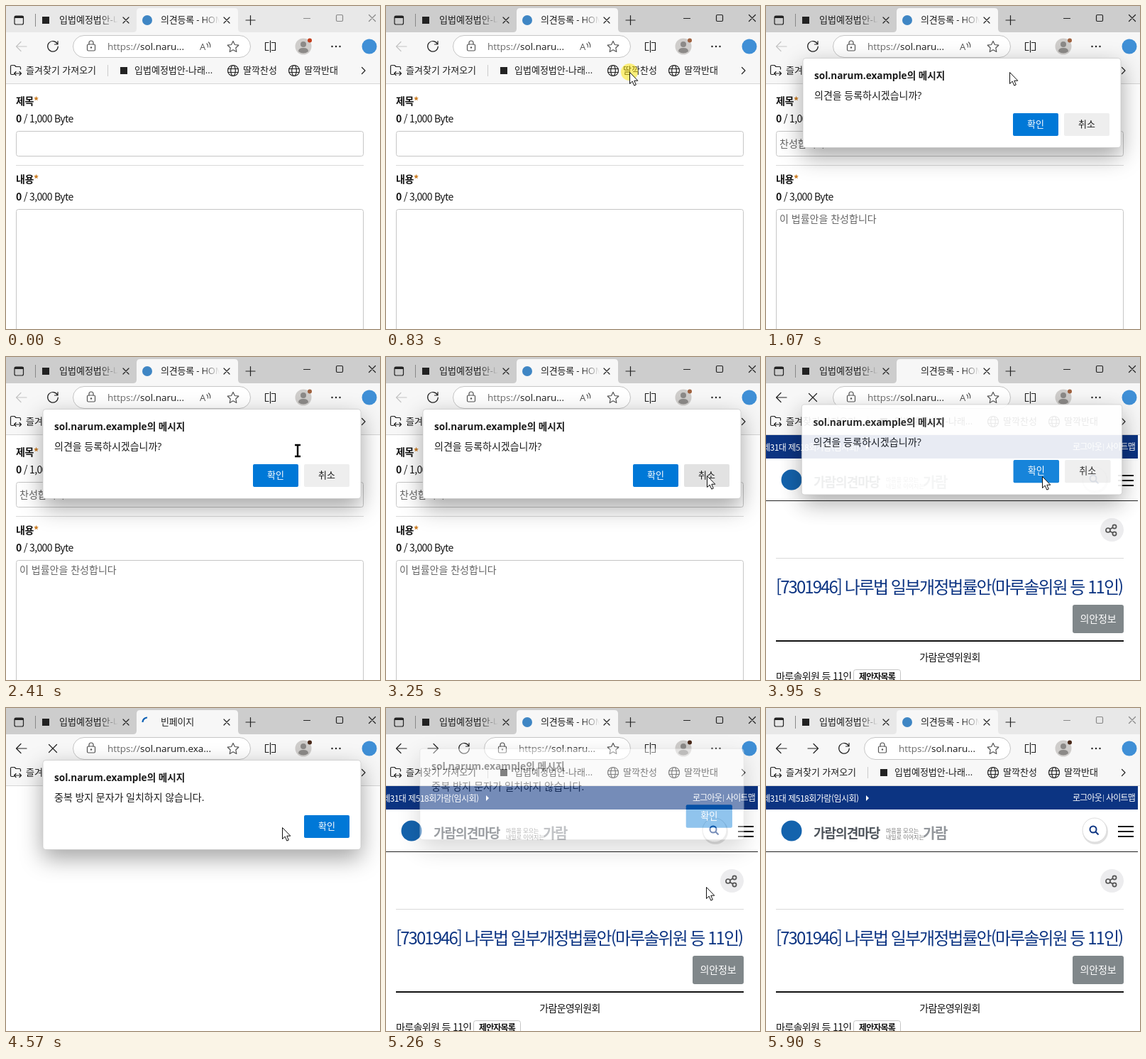
An HTML page that plays this animation: 527 by 455 pixels, repeating every 6050 ms.

```html
<!DOCTYPE html>
<html lang="ko">
<head>
<meta charset="utf-8">
<title>의견등록</title>
<style>
  html, body { margin: 0; width: 100%; height: 100%; overflow: hidden; background: #fff; }
  svg { display: block; width: 100vw; height: 100vh; }
  text { white-space: pre; }
  .ui { font: 13px "Open Sans", "Noto Sans CJK KR", sans-serif; fill: #1b1b1b; }
  .page { font: 14px "Noto Sans CJK KR", "Noto Sans CJK", sans-serif; letter-spacing: -.45px; fill: #111; }
  .b { font-weight: 700; }
  .mid { text-anchor: middle; }
  .line { fill: none; stroke: #222; stroke-width: 1.2; stroke-linecap: round; stroke-linejoin: round; }
  .field { fill: #fff; stroke: #c6c6c6; }
  .rule { fill: none; stroke: #d9d9d9; }
  .star { fill: #c9771a; }
  .bytes { letter-spacing: -.65px; }
  .typed { fill: #666; letter-spacing: 0; }
  #dialog { filter: drop-shadow(0 12px 16px rgba(0, 0, 0, .36)); }
  #dialog text { font-size: 14px; }
  #dialog .btn { font-size: 13px; }
  #dialog .white { fill: #fff; }
</style>
</head>
<body>
<svg viewBox="0 0 527 455" preserveAspectRatio="none">
  <defs>
    <linearGradient id="fade1" gradientUnits="userSpaceOnUse" x1="132" x2="158">
      <stop stop-color="#1b1b1b"/><stop offset="1" stop-color="#1b1b1b" stop-opacity="0"/>
    </linearGradient>
    <linearGradient id="fade2" gradientUnits="userSpaceOnUse" x1="276" x2="301">
      <stop stop-color="#1b1b1b"/><stop offset="1" stop-color="#1b1b1b" stop-opacity="0"/>
    </linearGradient>
    <path id="cross" d="M-4-4 4 4M4-4-4 4"/>
    <path id="arrow" d="M7 0H-7M-1-6.500-7.500 0-1 6.500"/>
    <path id="reload" d="M6.500-3.500A7.300 7.300 0 1 0 7.300 0M7-7.500V-3H2.500"/>
    <g id="globe">
      <circle r="7.500"/><ellipse rx="3.300" ry="7.500"/><path d="M-7-2.500H7M-7 2.500H7"/>
    </g>
  </defs>

  <rect width="527" height="455" fill="#fff"/>

  <!-- opinion form -->
  <g id="form" class="page">
    <text class="b" x="14" y="139">제목<tspan class="star">*</tspan></text>
    <text class="bytes" x="14" y="164"><tspan class="b">0</tspan> / 1,000 Byte</text>
    <rect class="field" x="14.500" y="176.500" width="489" height="35" rx="3"/>
    <path class="rule" d="M14 224.500H504"/>
    <text class="b" x="14" y="249">내용<tspan class="star">*</tspan></text>
    <text class="bytes" x="14" y="274"><tspan class="b">0</tspan> / 3,000 Byte</text>
    <rect class="field" x="14.500" y="286.500" width="489" height="190" rx="3"/>
    <g id="typed">
      <text class="typed" x="19" y="199">찬성합니다</text>
      <text class="typed" x="19" y="305">이 법률안을 찬성합니다</text>
    </g>
  </g>

  <!-- bill page -->
  <g id="bill" class="page">
    <rect y="110" width="524" height="33" fill="#0c3482"/>
    <g fill="#fff" font-size="12">
      <text x="-5" y="132" font-weight="500" letter-spacing="-.5">제31대 제518회가람(임시회)</text>
      <path d="M141 123v8l4-4z"/>
      <text x="432" y="131" letter-spacing="-.75">로그아웃</text>
      <text x="479" y="131" letter-spacing="-.75">사이트맵</text>
      <path d="M475.500 122v10" stroke="#8fa3c9"/>
    </g>
    <circle cx="36" cy="173" r="14.500" fill="#1463ad"/>
    <text class="b" x="67" y="183" style="font-size:18px;letter-spacing:-1px;fill:#4f555c">가람의견마당</text>
    <g font-size="8" letter-spacing="0" fill="#777">
      <text x="169" y="175.500">마음을 모으는</text>
      <text x="169" y="185">내일로 이어지는</text>
    </g>
    <text class="b" x="221" y="184" style="font-size:20px;letter-spacing:-1.500px;fill:#92969b">가람</text>
    <circle cx="464" cy="174" r="18" fill="#000" opacity=".12"/>
    <circle cx="463" cy="172" r="17" fill="#fff" stroke="#ddd"/>
    <g fill="none" stroke="#0c3482" stroke-width="2">
      <circle cx="461" cy="171" r="4.500"/><path d="M464.500 174.500l4 4"/>
    </g>
    <path d="M496 167h22M496 174h22M496 181h22" stroke="#111" stroke-width="2"/>
    <path d="M0 202.500H524" stroke="#222"/>
    <circle cx="487.500" cy="243.500" r="16.500" fill="#ececee"/>
    <g fill="none" stroke="#555" stroke-width="1.700">
      <path d="M484 243l5-3M484 245l5 3"/>
      <circle cx="482" cy="244" r="3"/><circle cx="491" cy="239" r="2.600"/><circle cx="491" cy="249" r="2.600"/>
    </g>
    <path class="rule" d="M14 283.500H504"/>
    <text x="14" y="333" style="font-size:24px;letter-spacing:-1.950px;fill:#0c3482">[7301946] 나루법 일부개정법률안(마루솔위원 등 11인)</text>
    <rect x="432" y="349" width="72" height="40" rx="3" fill="#80878a"/>
    <text class="mid" x="468" y="374" style="fill:#fff;letter-spacing:-.1px">의안정보</text>
    <path d="M14 400H504" stroke="#111" stroke-width="2"/>
    <text class="mid" x="259" y="428" style="letter-spacing:-.7px">가람운영위원회</text>
    <text x="14" y="455" style="letter-spacing:-.65px">마루솔위원 등 11인</text>
    <rect class="field" x="123.500" y="440.500" width="66" height="24" rx="3"/>
    <text class="mid b" x="156.500" y="455" style="font-size:12px;letter-spacing:-.8px">제안자목록</text>
  </g>

  <!-- title bar and tabs -->
  <g class="ui">
    <rect id="bar" width="527" height="38"/>
    <path d="M179 37q5 0 5-5V8q0-5 5-5H322q5 0 5 5V32q0 5 5 5z" fill="#f7f7f7"/>
    <rect class="line" x="12" y="14" width="12.500" height="12" rx="2"/>
    <path d="M12 15.500h12.500" stroke="#222" stroke-width="3"/>
    <path d="M41.500 11V29" stroke="#888"/>
    <rect x="51" y="15" width="10" height="10" fill="#222"/>
    <text x="75" y="24" style="fill:url(#fade1)">입법예정법안-나래</text>
    <g class="line">
      <use href="#cross" x="169" y="20"/>
      <use href="#cross" x="311" y="20"/>
      <path d="M344.500 13.500v13M338 20h13"/>
    </g>
    <circle id="icon" cx="199" cy="20" r="7" fill="#3f86c4"/>
    <path id="spin" d="M192.500 20A6.500 6.500 0 0 1 199 13.500" fill="none" stroke="#0f62b5" stroke-width="2.200"/>
    <text id="tab" x="218" y="24" style="fill:url(#fade2);letter-spacing:-.2px"></text>
    <g id="controls" class="line">
      <path d="M419.500 17.500h9M511.500 12.500l9 9m0-9l-9 9"/>
      <rect x="465.500" y="12.500" width="9" height="9" rx="1.500"/>
    </g>

    <!-- toolbar -->
    <rect y="37" width="527" height="72" fill="#f7f7f7"/>
    <path d="M0 109.500H527" stroke="#d6d6d6"/>
    <use id="back" class="line" href="#arrow" x="22" y="57"/>
    <use id="next" class="line" href="#arrow" transform="translate(66 57) scale(-1 1)"/>
    <use id="again" class="line" href="#reload" y="57"/>
    <path id="stop" class="line" d="M60.500 51.500l11 11m0-11l-11 11"/>
    <rect id="box" class="field" y="41.500" height="31" rx="15.500"/>
    <g id="address">
      <g class="line" style="stroke:#555">
        <rect x="114.500" y="54" width="11" height="9" rx="1.500"/>
        <path d="M117 54v-2a3 3 0 0 1 6 0v2"/>
      </g>
      <circle cx="120" cy="58.500" r="1.200" fill="#555"/>
      <text x="143" y="62" font-size="13.500"><tspan fill="#6b6b6b">https://</tspan><tspan id="host"></tspan></text>
    </g>
    <g id="aloud">
      <text x="273" y="62" style="fill:#555">A</text>
      <path class="line" style="stroke:#555" d="M283 53q2 2 1.500 5M285.500 51q3 3 2 7"/>
    </g>
    <path class="line" style="stroke:#555" d="M320 49.500l2.400 5 5.400.7-4 3.800 1 5.500-4.800-2.700-4.800 2.700 1-5.500-4-3.800 5.400-.7z"/>
    <path class="line" d="M370 51.500h-4.500v11h4.500M374.500 51.500h5v11h-5M372.500 49v16"/>
    <circle cx="419" cy="57" r="11.500" fill="#cfcdcb"/>
    <circle cx="419" cy="54" r="4" fill="#8c8a88"/>
    <path d="M412 64q0-5 7-5t7 5q-7 5-14 0z" fill="#8c8a88"/>
    <circle id="badge" cx="428" cy="48.500" r="3"/>
    <path d="M459.500 57h.01M465 57h.01M470.500 57h.01" stroke="#222" stroke-width="2.400" stroke-linecap="round"/>
    <circle cx="512" cy="57" r="10.500" fill="#3f8fd6"/>

    <!-- favourites -->
    <path class="line" d="M11 96.500H8q-1.500 0-1.500-1.500V85q0-1.500 1.500-1.500h4l2 2h5q1.500 0 1.500 1.500v2M12 95h9m-7-2.500L11.500 95l2.500 2.500m5-5l2.500 2.500-2.500 2.500"/>
    <text x="28" y="95">즐겨찾기 가져오기</text>
    <path d="M143.500 83V99" stroke="#ccc"/>
    <rect x="161" y="86" width="10" height="10" fill="#222"/>
    <text x="181" y="95">입법예정법안-나래...</text>
    <use class="line" href="#globe" x="320" y="91"/>
    <text x="334" y="95">딸깍찬성</text>
    <use class="line" href="#globe" x="406" y="91"/>
    <text x="420" y="95">딸깍반대</text>
    <path class="line" d="M501.500 86.500l4.500 4.500-4.500 4.500"/>
  </g>

  <g id="dialog" class="ui">
    <rect x="52" y="73.500" width="448" height="126" rx="4" fill="#fff" stroke="#c4c4c4" stroke-width=".7"/>
    <text class="b" x="68" y="103" style="font-size:13.600px">sol.narum.example의 메시지</text>
    <g id="ask">
      <text x="68" y="131">의견을 등록하시겠습니까?</text>
      <rect id="yes" x="348" y="151" width="64" height="32" rx="2"/>
      <text class="btn mid white" x="380" y="171">확인</text>
      <rect id="no" x="420" y="151" width="64" height="32" rx="2"/>
      <text class="btn mid" x="452" y="171">취소</text>
    </g>
    <g id="fail">
      <text x="68" y="131">중복 방지 문자가 일치하지 않습니다.</text>
      <rect id="ok" x="420" y="151" width="64" height="32" rx="2"/>
      <text class="btn mid white" x="452" y="171">확인</text>
    </g>
  </g>

  <g id="cursor">
    <circle id="press" r="12" fill="#ffe600" opacity=".5"/>
    <path id="pointer" d="M.5.500V16.500l3.700-3.400 2.600 6 2.500-1.100-2.500-5.800h5z" fill="#fff" stroke="#111"/>
    <g id="beam" fill="none">
      <path d="M-4-8H4M-4 8H4M0-8V8" stroke="#fff" stroke-width="4"/>
      <path d="M-4-8H4M-4 8H4M0-8V8" stroke="#000" stroke-width="2.400"/>
    </g>
  </g>
</svg>
<script>
const LOOP = 6050;
const LOAD = 3920, BLANK = 4240, DONE = 5200;
// cursor stops: time, x, y
const stops = [
  [230, 470, 281], [700, 343, 93], [1970, 343, 93], [2530, 429, 143],
  [2600, 429, 143], [2920, 452, 167], [3250, 452, 167], [3620, 389, 168],
  [4620, 389, 168], [4950, 445, 174], [5200, 445, 174], [5440, 470, 480]
];
const clicks = [[740, 890], [3740, 3890], [5020, 5110]];

const $ = id => document.getElementById(id);
const set = (id, name, value) => $(id).setAttribute(name, value);
const show = (id, on) => set(id, 'visibility', on ? 'visible' : 'hidden');
const within = (t, a, b) => t >= a && t < b;
const part = (t, a, b) => Math.min(1, Math.max(0, (t - a) / (b - a)));

function cursorAt(t) {
  let i = 0;
  while (i < stops.length - 2 && t >= stops[i + 1][0]) i++;
  const [a, x, y] = stops[i], [b, u, v] = stops[i + 1], p = part(t, a, b);
  return [x + (u - x) * p, y + (v - y) * p];
}

function drawChrome(t) {
  const active = within(t, 740, 5900), blank = within(t, BLANK, DONE);
  const loading = within(t, LOAD, DONE), done = t >= DONE;
  set('bar', 'fill', active ? '#cdcdcd' : '#e8e8e8');
  $('controls').style.stroke = active ? '#222' : '#888';
  $('back').style.stroke = t < LOAD ? '#c4c4c4' : '#222';
  set('badge', 'fill', t < 740 ? '#c43e1c' : t < BLANK ? '#a0623f' : '#4a2a1a');
  show('icon', !loading);
  show('spin', blank);
  set('spin', 'transform', `rotate(${(t - 4570) * .4} 199 20)`);
  $('tab').textContent = blank ? '빈페이지' : '의견등록 - HOME';
  $('host').textContent = blank ? 'sol.narum.exa...' : 'sol.naru...';
  show('stop', loading);
  show('again', !loading);
  show('next', done);
  show('aloud', t < BLANK);
  const shift = done ? 44 : 0;
  set('again', 'x', 66 + shift);
  set('box', 'x', 94.5 + shift);
  set('box', 'width', 250 - shift);
  set('address', 'transform', `translate(${shift})`);
}

function drawDialog(t, x, y, pressed) {
  const first = t < 4200;
  const [a, b, c, d] = first ? [890, 1070, 3890, 4090] : [4270, 4450, 5110, 5310];
  const enter = 1 - (1 - part(t, a, b)) ** 2, leave = part(t, c, d);
  const on = within(t, a, d), open = within(t, b, c), away = 1 - enter + leave;
  $('dialog').style.display = on ? '' : 'none';
  set('dialog', 'opacity', enter * (1 - leave ** 2));
  set('dialog', 'transform',
    `translate(276 ${136 - 20 * away}) scale(${1 + .025 * away}) translate(-276 -136)`);
  $('ask').style.display = first ? '' : 'none';
  $('fail').style.display = first ? 'none' : '';
  const over = left => open && within(x, left, left + 64) && within(y, 151, 183);
  const blue = left => !over(left) ? '#0078d7' : pressed ? '#005fac' : '#006cbf';
  set('yes', 'fill', blue(348));
  set('no', 'fill', over(420) ? '#e2e2e2' : '#eee');
  set('ok', 'fill', blue(420));
}

function draw(t) {
  const [x, y] = cursorAt(t);
  const pressed = clicks.some(([a, b]) => within(t, a, b));
  const text = within(t, 1970, 2600) && within(y, 117, 141);
  show('form', t < LOAD);
  show('typed', within(t, 890, LOAD));
  show('bill', within(t, LOAD, BLANK) || t >= DONE);
  drawChrome(t);
  drawDialog(t, x, y, pressed);
  $('cursor').style.display = t < 230 ? 'none' : '';
  set('cursor', 'transform', `translate(${Math.round(x)} ${Math.round(y)})`);
  show('press', pressed);
  show('pointer', !text);
  show('beam', text);
}

const start = performance.now();
function tick() {
  draw((performance.now() - start) % LOOP);
  requestAnimationFrame(tick);
}
tick();
</script>
</body>
</html>
```
